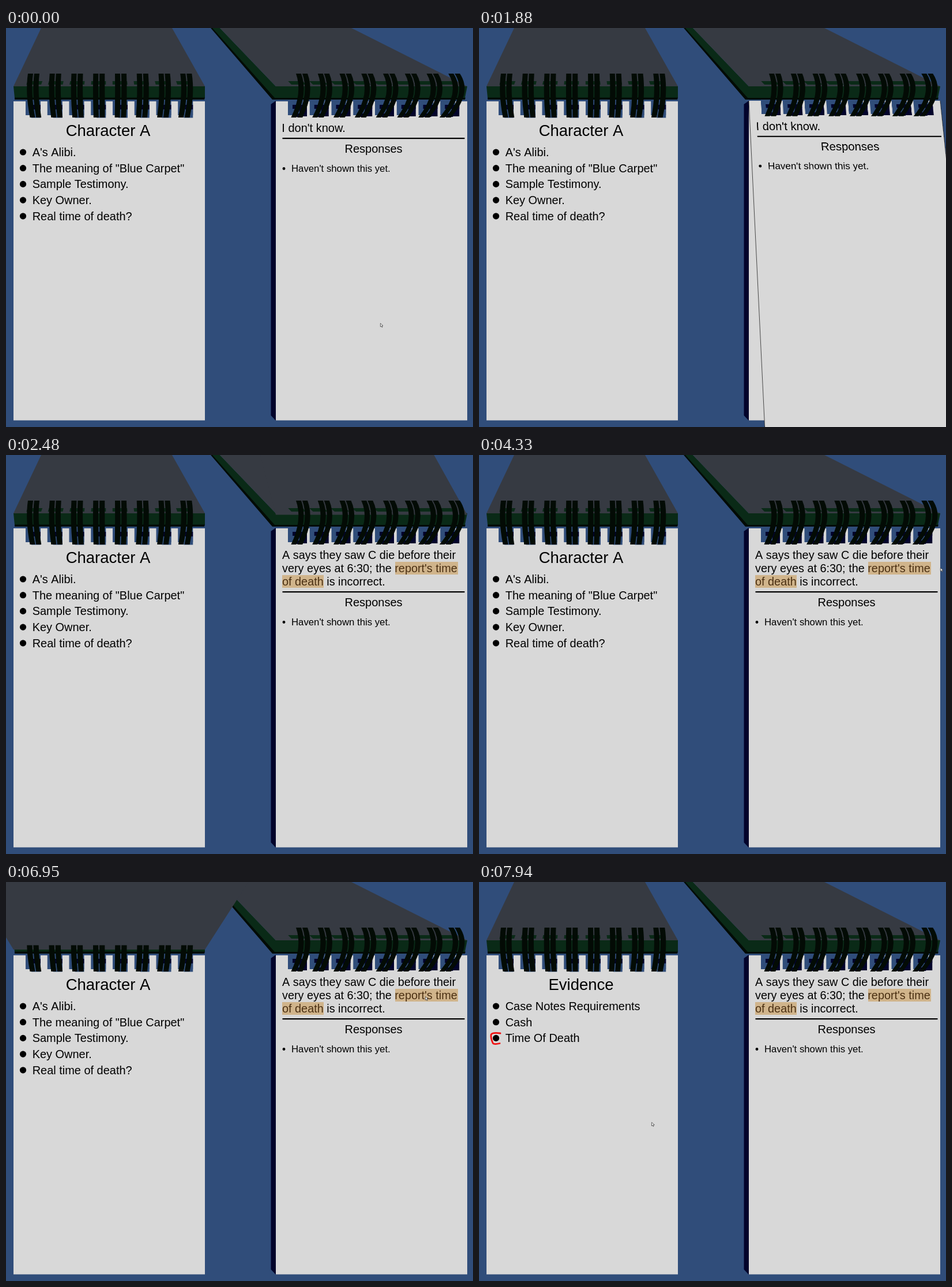
These frames come from a looping animation (810x691 px, 8000 ms). An HTML page with a canvas:

```html
<!DOCTYPE html>
<html lang="en">
<head>
<meta charset="utf-8">
<title>Notepads</title>
<style>
html, body { margin: 0; width: 100%; height: 100%; overflow: hidden; background: #304d7a; }
canvas { display: block; }
</style>
</head>
<body>
<canvas id="stage" width="810" height="691"></canvas>
<script>
const W = 810, H = 691, LOOP = 8000;
const stage = document.getElementById('stage').getContext('2d');
const BLUE = '#304d7a', PAPER = '#d8d8d8', BACK = '#363a42', GREEN = '#0a2a17',
  INK = '#000', RING = '#030b05', NAVY = '#02032b';
const FONT = '"Liberation Sans", Arial, sans-serif';

// Shared camera: vanishing point and focal length
const VX = 175, VY = 345, FOCAL = 1000;
const TOP = 127, PAGE_W = 332, PAGE_H = 552.5, STEP = 37.75, OPEN = 240;
const LEFT = 13, RIGHT = 468;
const SWING_TIME = 800, TURN_START = 1820, RETURN_START = 6586;

function poly(c, color, ...pts) {
  c.fillStyle = color;
  c.beginPath();
  pts.forEach(([x, y]) => c.lineTo(x, y));
  c.fill();
}

function rect(c, color, x, y, w, h) {
  c.fillStyle = color;
  c.fillRect(x, y, w, h);
}

function dot(c, x, y, r) {
  c.fillStyle = INK;
  c.beginPath();
  c.arc(x, y, r, 0, 7);
  c.fill();
}

function text(c, str, x, y, size, align = 'left', color = INK) {
  c.font = size + 'px ' + FONT;
  c.textAlign = align;
  c.fillStyle = color;
  c.fillText(str, x, y);
}

function smooth(from, to, t) {
  const s = Math.min(1, Math.max(0, (t - from) / (to - from)));
  return s * s * (3 - 2 * s);
}

// A sheet lifts steadily, with a quick whip past the camera
const swingAngle = p => OPEN / 2 * (p + smooth(0.4, 0.87, p));

// Point on the Bezier curve through the given control points
function bezier(pts, s) {
  if (pts.length === 1) return pts[0];
  return bezier(pts.slice(1).map(([x, y], i) =>
    [pts[i][0] + (x - pts[i][0]) * s, pts[i][1] + (y - pts[i][1]) * s]), s);
}

// Pointer moves: start, end, then controls and the resting place
const HOME = [649, 511];
const GLIDES = [
  [540, 1480, [420, 660], [60, 600], [177, 327]],
  [3090, 3900, [280, 500], [560, 510], [697, 219]],
  [3900, 4220, [800, 195]],
  [4370, 4680, [547, 237]],
  [4720, 5560, [280, 190], [880, 190], [727, 198]],
  [7080, 7350, [700, 212]],
  [7480, 7930, [299, 416]]
];

function pointerAt(t) {
  let place = HOME;
  for (const [start, end, ...path] of GLIDES) {
    if (t < start) break;
    place = bezier([place, ...path], smooth(start, end, t));
  }
  return place;
}

function list(title, items, marked) {
  return c => {
    text(c, title, 177, 187, 27.5, 'center');
    items.forEach((item, i) => {
      const y = 222 + i * 27.7;
      dot(c, 29.5, y - 7, 5.6);
      text(c, item, 45.7, y, 19.95);
    });
    if (!marked) return;
    c.strokeStyle = '#f01010';
    c.lineWidth = 2.8;
    c.lineCap = c.lineJoin = 'round';
    c.beginPath();
    c.moveTo(37, 262);
    c.quadraticCurveTo(24, 260, 21, 264);
    c.quadraticCurveTo(20, 270, 24, 279);
    c.quadraticCurveTo(26, 282, 36, 279.5);
    c.stroke();
  };
}

function answers(c, y) {
  rect(c, INK, 479.5, y, 316, 2.2);
  text(c, 'Responses', 637.5, y + 26, 20, 'center');
  dot(c, 482, y + 53.5, 2.4);
  text(c, "Haven't shown this yet.", 495, y + 59, 16.75);
}

const character = list('Character A', ["A's Alibi.", 'The meaning of "Blue Carpet"',
  'Sample Testimony.', 'Key Owner.', 'Real time of death?']);
const evidence = list('Evidence', ['Case Notes Requirements', 'Cash', 'Time Of Death'], true);

function unknown(c) {
  text(c, "I don't know.", 478.3, 180, 20);
  answers(c, 190);
}

function statement(c) {
  const size = 19.85, brown = '#4b3013';
  rect(c, '#d0b48b', 675, 185, 109, 22);
  rect(c, '#d0b48b', 479, 208, 72, 22);
  text(c, 'A says they saw C die before their', 479, 180, size);
  const put = (first, second, y, colors) => {
    text(c, first, 479, y, size, 'left', colors[0]);
    text(c, second, 479 + c.measureText(first).width, y, size, 'left', colors[1]);
  };
  put('very eyes at 6:30; the ', "report's time", 203, [INK, brown]);
  put('of death', ' is incorrect.', 226, [brown, INK]);
  answers(c, 236);
}

function sheet(c, x, content) {
  rect(c, PAPER, x, TOP, PAGE_W, PAGE_H);
  for (let i = 0; i < 8; i++) {
    const h = x + 21 + i * STEP;
    rect(c, BLUE, h, TOP, 26, 24);
    if (x === RIGHT) {
      rect(c, NAVY, h + 8, 133, 25, 7);
      rect(c, NAVY, h + 20, 133, 13, 20);
      rect(c, NAVY, h + 8, 148, 14, 6);
    } else {
      rect(c, NAVY, h + 12, 133, 14, 8);
      rect(c, BLUE, h + 10, 141, 16, 14.5);
    }
  }
  content(c);
}

// High resolution copy of a sheet for the perspective drawing
function snapshot(x, content) {
  const el = document.createElement('canvas');
  el.width = PAGE_W * 2;
  el.height = PAGE_H * 2;
  const c = el.getContext('2d');
  c.scale(2, 2);
  c.translate(-x, -TOP);
  sheet(c, x, content);
  return el;
}

const unknownCopy = snapshot(RIGHT, unknown), evidenceCopy = snapshot(LEFT, evidence);

function projection(angle) {
  const a = angle * Math.PI / 180, cos = Math.cos(a), sin = Math.sin(a);
  const edge = TOP - 26 * angle / OPEN - VY;
  const scale = d => FOCAL / (FOCAL - d * sin);
  return {
    scale,
    yAt: d => VY + (edge + d * cos) * scale(d),
    xAt: (px, d) => VX + (px - VX) * scale(d),
    depthAt: y => FOCAL * (y - VY - edge) / (FOCAL * cos + (y - VY) * sin)
  };
}

function flying(c, x, view, copy) {
  const { scale, yAt, xAt, depthAt } = view;
  const r = x + PAGE_W, y0 = yAt(0), y1 = yAt(PAGE_H);
  if (y1 < y0) {
    poly(c, BACK, [x, y0], [r, y0], [xAt(r, PAGE_H), y1], [xAt(x, PAGE_H), y1]);
    return;
  }
  const end = Math.min(H, y1);
  for (let y = Math.round(y0); y < end; y++) {
    const d = Math.max(0, depthAt(y)), next = Math.min(PAGE_H, depthAt(y + 1));
    if (next <= d) continue;
    c.drawImage(copy, 0, d * 2, PAGE_W * 2, (next - d) * 2,
      xAt(x, d), y, PAGE_W * scale(d), 1);
  }
  c.strokeStyle = '#222';
  c.lineWidth = 0.8;
  for (const side of [x, r]) {
    c.beginPath();
    c.moveTo(side, y0);
    c.lineTo(xAt(side, PAGE_H), y1);
    c.stroke();
  }
}

// Each ring is a pair of strands bulging away from the vanishing point
function rings(c, x, from, to) {
  c.save();
  c.beginPath();
  c.rect(0, from, W, to - from);
  c.clip();
  c.fillStyle = RING;
  for (let i = 0; i < 8; i++) {
    const left = x + (x === RIGHT ? 35 : 25) + i * STEP;
    for (const sx of [left, left + 11]) {
      const off = sx - VX, bend = sx + off * 0.036, foot = sx - off * 0.026;
      c.beginPath();
      c.moveTo(sx, 79);
      c.quadraticCurveTo(bend, 112, foot, 155);
      c.lineTo(foot + 9, 155);
      c.quadraticCurveTo(bend + 9.5, 112, sx + 9, 79);
      c.fill();
    }
  }
  c.restore();
}

function backHoles(c, x) {
  const near = px => VX + (px - VX) * 0.991, far = px => VX + (px - VX) * 0.973;
  for (let i = 0; i < 8; i++) {
    const h = x + (x === RIGHT ? 30 : 21) + i * STEP;
    poly(c, GREEN, [near(h), 98], [far(h), 92], [far(h + 26), 92], [near(h + 26), 98]);
  }
}

function cover(c, x) {
  if (x === LEFT) {
    poly(c, BACK, [13, 101], [61, 0], [288, 0], [345, 101]);
    poly(c, GREEN, [13, 101], [345, 101], [345, 121], [15, 121]);
    poly(c, RING, [15, 120.5], [345, 120.5], [344, 124], [15, 124]);
    return;
  }
  poly(c, RING, [355, 0], [366, 0], [475, 120.5], [797, 120.5], [796, 124], [462, 124]);
  poly(c, GREEN, [358, 0], [371, 0], [468, 101], [800, 101], [796, 121], [466, 121]);
  poly(c, BACK, [371, 0], [599, 0], [800, 101], [468, 101]);
  poly(c, NAVY, [468, 126], [459.5, 132], [459.5, 671], [468, 680]);
}

// Progress p runs from 0 (sheet lying in front) to 1 (turned over the back)
function notepad(c, x, content, p, copy) {
  cover(c, x);
  sheet(c, x, content);
  const moving = p > 0 && p < 1, angle = moving ? swingAngle(p) : OPEN;
  let from = 79, to = 156;
  if (moving) {
    const view = projection(angle), hole = view.yAt(28);
    flying(c, x, view, copy);
    if (angle < 80) to = Math.min(to, hole);
    else if (angle < 180) from = Math.max(from, hole);
  }
  if (angle < 60 || angle > 200) backHoles(c, x);
  rings(c, x, from, to);
}

function pointer(c, [x, y]) {
  c.beginPath();
  [[0, 0], [0, 6], [1.5, 4.8], [2.6, 7], [3.7, 6.5], [2.7, 4.4], [4.6, 4.2]]
    .forEach(([dx, dy]) => c.lineTo(x + 0.4 + dx, y + 0.4 + dy));
  c.closePath();
  c.fillStyle = '#eee';
  c.fill();
  c.strokeStyle = '#333';
  c.lineWidth = 0.7;
  c.stroke();
}

function draw(t) {
  const turn = (t - TURN_START) / SWING_TIME;
  const back = (t - RETURN_START) / SWING_TIME;
  rect(stage, BLUE, 0, 0, W, H);
  notepad(stage, RIGHT, turn > 0 ? statement : unknown, turn, unknownCopy);
  notepad(stage, LEFT, back < 1 ? character : evidence, 1 - back, evidenceCopy);
  pointer(stage, pointerAt(t));
}

const start = performance.now();
function tick() {
  draw((performance.now() - start) % LOOP);
  requestAnimationFrame(tick);
}
tick();
</script>
</body>
</html>
```
